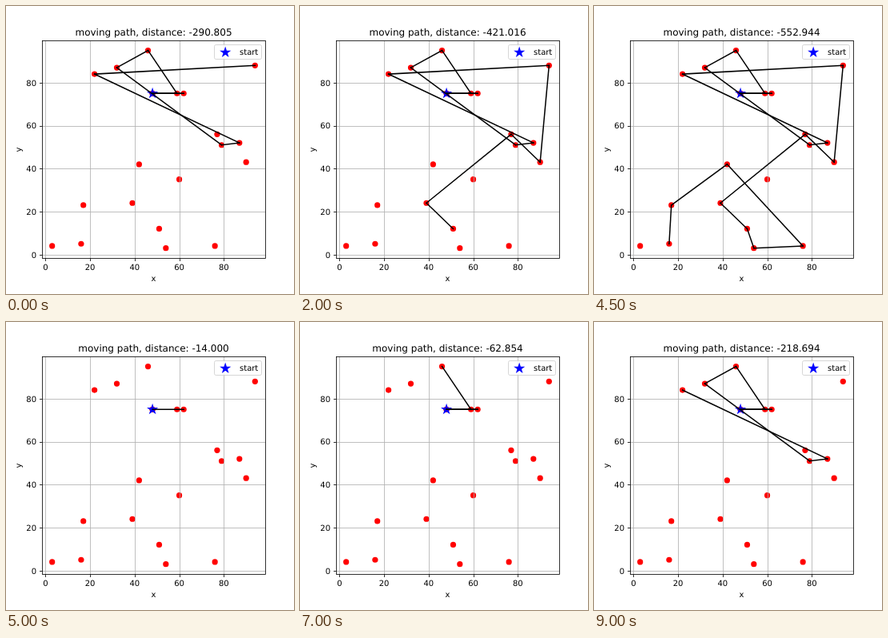
Recreate the animation shown at these times as an HTML page. Size 360x360 px, loop 9500 ms.

```html
<!DOCTYPE html>
<html lang="en">
<head>
<meta charset="utf-8">
<title>Moving path</title>
<style>
  html, body { margin: 0; width: 100%; height: 100%; overflow: hidden; background: #fff; }
  svg { display: block; width: 360px; height: 360px; }
  text { font: 10px "DejaVu Sans", sans-serif; text-rendering: geometricPrecision; }
  #title { font-size: 12px; }
  .mid { text-anchor: middle; }
  .end { text-anchor: end; }
  .grid { stroke: #b0b0b0; stroke-width: .8; }
  .axis { stroke: #000; stroke-width: .8; fill: none; }
  .hop { stroke: #000; stroke-width: 1.5; stroke-linecap: square; }
  .star { fill: #00f; stroke: #00f; stroke-width: 1.5; stroke-miterlimit: 10; }
</style>
</head>
<body>
<svg id="plot" viewBox="0 0 360 360"></svg>
<script>
const STEP = 500;
const BOX = { left: 45, right: 324, top: 43.2, bottom: 315 };
const MID_X = (BOX.left + BOX.right) / 2;

// Stops in visiting order; the first is the start.
const route = [
  [48, 75], [62, 75], [48, 75], [59, 75], [46, 95], [32, 87], [79, 51],
  [87, 52], [22, 84], [94, 88], [90, 43], [77, 56], [39, 24], [51, 12],
  [54, 3], [76, 4], [42, 42], [17, 23], [16, 5], [3, 4]
];
const unvisited = [[60, 35]];

// Number of hops shown at each step of the loop.
const order = [9, 10, 11, 12, 13, 14, 15, 16, 17, 18, 1, 19, 2, 3, 4, 5, 6, 7, 8];

const px = x => BOX.left + (x + 1.55) * (BOX.right - BOX.left) / 100.1;
const py = y => BOX.bottom - (y + 1.6) * (BOX.bottom - BOX.top) / 101.2;
const snap = v => Math.floor(v + .5) + .5;

const plot = document.getElementById("plot");

function add(tag, attrs, text) {
  const el = document.createElementNS("http://www.w3.org/2000/svg", tag);
  for (const key in attrs) el.setAttribute(key, attrs[key]);
  if (text !== undefined) el.textContent = text;
  return plot.appendChild(el);
}

function line(cls, x1, y1, x2, y2) {
  return add("line", { class: cls, x1, y1, x2, y2 });
}

function star(cx, cy) {
  const points = Array.from({ length: 10 }, (_, i) => {
    const r = i % 2 ? 5 * .381966 : 5;
    const a = i * Math.PI / 5;
    return [cx + r * Math.sin(a), cy - r * Math.cos(a)];
  });
  add("polygon", { class: "star", points: points.join(" ") });
}

const L = snap(BOX.left), R = snap(BOX.right), T = snap(BOX.top), B = snap(BOX.bottom);
const ticks = [0, 20, 40, 60, 80];

for (const [x, y] of [...route, ...unvisited])
  add("circle", { cx: px(x), cy: py(y), r: 3.6, fill: "#f00" });
star(px(48), py(75));

// The grid lies above the markers and below the path.
for (const v of ticks) {
  const x = snap(px(v)), y = snap(py(v));
  line("grid", x, T, x, B);
  line("grid", L, y, R, y);
}

const hops = route.slice(1).map(([x, y], i) =>
  line("hop", px(route[i][0]), py(route[i][1]), px(x), py(y)));

for (const v of ticks) {
  const x = snap(px(v)), y = snap(py(v));
  line("axis", x, B, x, B + 3.5);
  line("axis", L - 3.5, y, L, y);
  add("text", { class: "mid", x: px(v), y: 330 }, v);
  add("text", { class: "end", x: 38, y: Math.round(py(v) + 3.8) }, v);
}
add("rect", { class: "axis", x: L, y: T, width: R - L, height: B - T });

add("text", { class: "mid", x: MID_X, y: 344 }, "x");
add("text", { class: "mid", transform: "translate(19 179.5) rotate(-90)" }, "y");

add("rect", { x: 260.5, y: 48.5, width: 59, height: 18, rx: 2,
  fill: "#fff", "fill-opacity": .8, stroke: "#ccc", "stroke-opacity": .8 });
star(274.2, 58);
add("text", { x: 292, y: 61 }, "start");

const title = add("text", { id: "title", class: "mid", x: MID_X, y: 37 });

const lengths = [0];
for (let i = 1; i < route.length; i++) {
  const [a, b] = [route[i - 1], route[i]];
  lengths.push(lengths[i - 1] + Math.hypot(b[0] - a[0], b[1] - a[1]));
}

let shown = 0;
function draw() {
  const count = order[Math.floor(performance.now() / STEP) % order.length];
  if (count !== shown) {
    shown = count;
    hops.forEach((hop, i) => hop.setAttribute("visibility", i < count ? "visible" : "hidden"));
    title.textContent = `moving path, distance: -${lengths[count].toFixed(3)}`;
  }
  requestAnimationFrame(draw);
}
draw();
</script>
</body>
</html>
```
